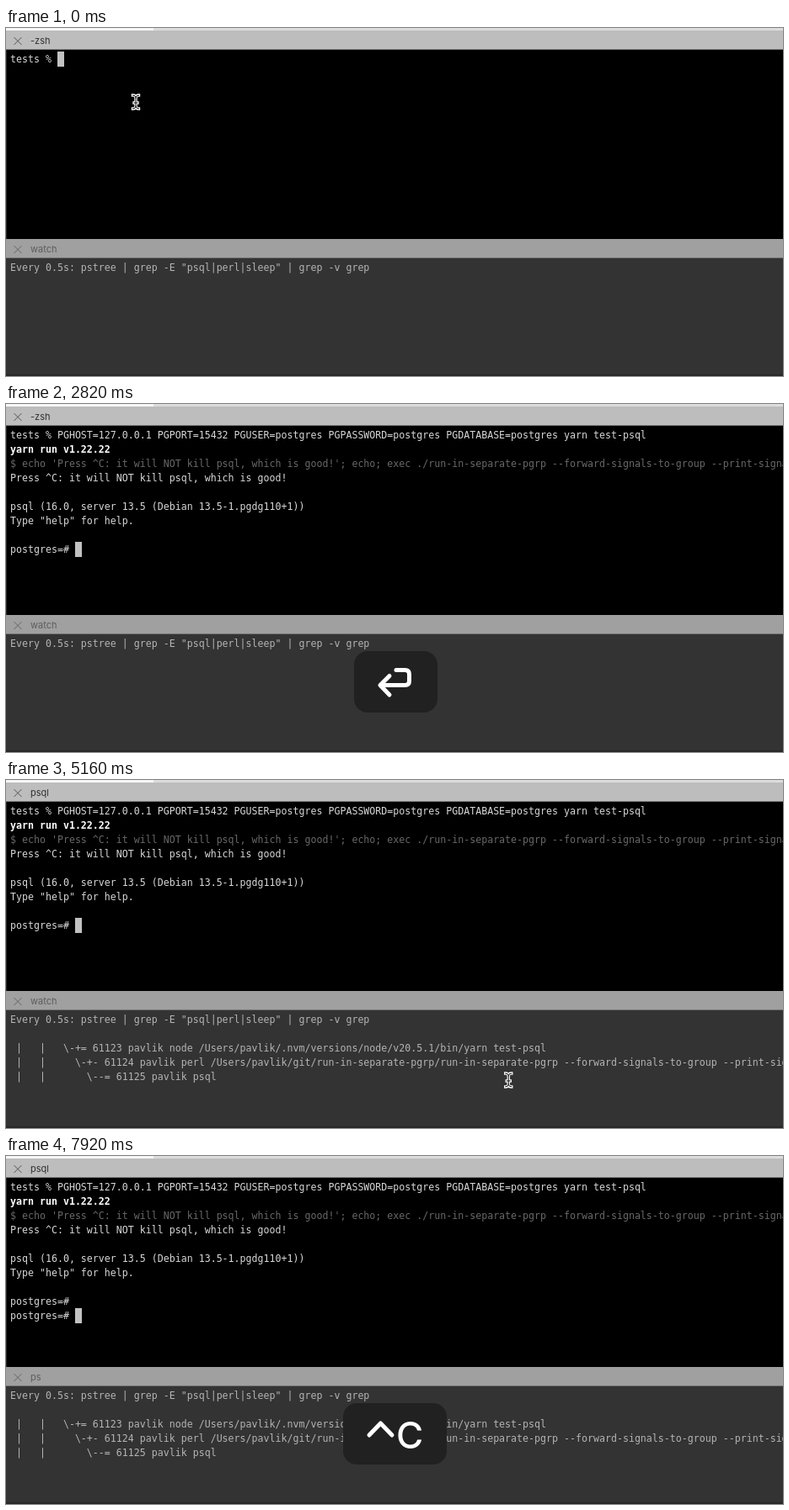
Recreate the animation shown at these times as an HTML page. Size 922x414 px, loop 8 s.

```html
<!DOCTYPE html>
<html lang="en">
<head>
<meta charset="utf-8">
<title>Terminal session</title>
<style>
  html, body { margin: 0; width: 100%; height: 100%; overflow: hidden; background: #000; }
  svg { display: block; width: 922px; height: 414px; }
  text { white-space: pre; }
  .term { font: 11.627px "DejaVu Sans Mono", "Noto Sans Mono", monospace; fill: #d8d8d8; }
  .low { fill: #b4b4b4; }
  .bold { font-weight: 700; fill: #fff; }
  .dim { fill: #686868; }
  .tab { font: 11px Inter, "Liberation Sans", sans-serif; }
  .key rect { fill: #212121; }
  .key path { fill: none; stroke: #fff; stroke-width: 5; stroke-linecap: round; stroke-linejoin: round; }
  .key text { font: 500 44px Inter, "Liberation Sans", sans-serif; fill: #fff; }
  #beam use { fill: none; stroke-linecap: square; }
</style>
</head>
<body>
<svg viewBox="0 0 922 414">
  <defs>
    <path id="beamShape" d="M-3.5-8q3.5 0 3.5 3v10q0 3-3.5 3M3.5-8q-3.5 0-3.5 3m0 10q0 3 3.5 3M-2 1h4"/>
  </defs>
  <rect width="922" height="414"/>
  <rect width="922" height="3" fill="#dcdcdc"/>
  <rect width="175" height="3" fill="#f6f6f6"/>
  <rect y="3" width="922" height="22" fill="#bdbdbd"/>
  <rect y="25" width="922" height="1" fill="#777"/>
  <rect y="26" width="1" height="225" fill="#2a2a2a"/>
  <rect y="251" width="922" height="22" fill="#a0a0a0"/>
  <rect y="273" width="922" height="1" fill="#707070"/>
  <rect y="274" width="922" height="140" fill="#333"/>
  <rect y="412" width="922" height="2" fill="#272727"/>
  <path d="M9.5 11l9 9m0-9l-9 9" stroke="#555"/>
  <path d="M9.5 259l9 9m0-9l-9 9" stroke="#666"/>
  <text id="topTab" class="tab" x="29" y="19" fill="#303030"></text>
  <text id="lowTab" class="tab" x="29" y="267" fill="#5c5c5c"></text>

  <g id="shell"></g>
  <rect id="caret" width="8" height="18" fill="#c2c2c2"/>
  <g id="watch"></g>

  <g class="key" id="up">
    <rect x="424" y="294" width="76" height="73" rx="16"/>
    <path d="M462 348V315M449 328l13-13 13 13"/>
  </g>
  <g class="key" id="enter">
    <rect x="413" y="294" width="99" height="73" rx="16"/>
    <path d="M463 316.5h10.5q5 0 5 5v8q0 5-5 5H446M455 323.5l-11 11 11 11.5"/>
  </g>
  <g class="key" id="ctrlC">
    <rect x="400" y="294" width="123" height="73" rx="16"/>
    <path d="M431 332l13.5-14 13.5 14"/>
    <text x="463" y="348">C</text>
  </g>

  <g id="mouse">
    <circle id="ring" cx="-.5" r="25" fill="none" stroke="#134288" stroke-width="3"/>
    <g id="beam">
      <use href="#beamShape" stroke="#fff" stroke-width="3.4"/>
      <use href="#beamShape" stroke="#111" stroke-width="1"/>
    </g>
  </g>
</svg>
<script>
const LOOP = 8000, COL = 7, ROW = 17, LEFT = 5;
const $ = id => document.getElementById(id);
const PROMPT = 'tests % ', PSQL = 'postgres=# ';
const FLAGS = '--forward-signals-to-group --print-signals';
const COMMAND = PROMPT + 'PGHOST=127.0.0.1 PGPORT=15432 PGUSER=postgres PGPASSWORD=postgres PGDATABASE=postgres yarn test-psql';

// Each row: text, style, time it appears
const shellRows = [
  [COMMAND, '', 0],
  ['yarn run v1.22.22', 'bold', 2700],
  ["$ echo 'Press ^C: it will NOT kill psql, which is good!'; echo; exec ./run-in-separate-pgrp " + FLAGS, 'dim', 2700],
  ['Press ^C: it will NOT kill psql, which is good!', '', 2760],
  ['', '', 2760],
  ['psql (16.0, server 13.5 (Debian 13.5-1.pgdg110+1))', '', 2760],
  ['Type "help" for help.', '', 2760],
  ['', '', 2760],
  [PSQL, '', 2760],
  [PSQL, '', 7680]
];
const watchRows = [
  ['Every 0.5s: pstree | grep -E "psql|perl|sleep" | grep -v grep', 'low', 0],
  ['', 'low', 0],
  [' |   |   \\-+= 61123 pavlik node /Users/pavlik/.nvm/versions/node/v20.5.1/bin/yarn test-psql', 'low', 3120],
  [' |   |     \\-+- 61124 pavlik perl /Users/pavlik/git/run-in-separate-pgrp/run-in-separate-pgrp ' + FLAGS, 'low', 3120],
  [' |   |       \\--= 61125 pavlik psql', 'low', 3120]
];
// Caret: time, row, column
const caretSteps = [
  [0, 0, PROMPT.length], [1920, 0, COMMAND.length], [2580, 1, 0],
  [2700, 3, 0], [2760, 8, PSQL.length], [7680, 9, PSQL.length]
];
// Pointer: time, x, y
const path = [
  [3480, 154, 88], [3900, 223, 130], [4260, 238, 335], [4500, 205, 354],
  [4980, 640, 352], [5160, 597, 357], [5520, 330, 345], [5940, 235, 300],
  [6420, 204, 219]
];

function addRows(parent, rows, baseline) {
  return rows.map(([text, style, from], i) => {
    const node = document.createElementNS('http://www.w3.org/2000/svg', 'text');
    node.setAttribute('class', 'term ' + style);
    node.setAttribute('x', LEFT);
    node.setAttribute('y', baseline + i * ROW);
    node.textContent = text;
    parent.append(node);
    return { node, from };
  });
}
const rows = [...addRows($('shell'), shellRows, 41), ...addRows($('watch'), watchRows, 289)];
const commandRow = rows[0].node;

const show = (node, on) => node.setAttribute('visibility', on ? 'visible' : 'hidden');
const between = (t, a, b) => t >= a && t < b;

function pointerAt(t) {
  if (t <= path[0][0]) return path[0].slice(1);
  const i = path.findIndex(p => p[0] > t);
  if (i < 0) return path[path.length - 1].slice(1);
  const [t0, x0, y0] = path[i - 1], [t1, x1, y1] = path[i];
  const k = (t - t0) / (t1 - t0);
  return [x0 + (x1 - x0) * k, y0 + (y1 - y0) * k];
}

function draw(t) {
  commandRow.textContent = t < 1920 ? PROMPT : COMMAND;
  rows.forEach(r => show(r.node, t >= r.from));

  const [, row, col] = caretSteps.filter(s => t >= s[0]).pop();
  $('caret').setAttribute('x', LEFT + col * COL);
  $('caret').setAttribute('y', 28 + row * ROW);

  $('topTab').textContent = t < 3000 ? '-zsh' : 'psql';
  $('lowTab').textContent = t < 7860 ? 'watch' : 'ps';

  show($('up'), between(t, 1920, 2580));
  show($('enter'), between(t, 2580, 3360));
  $('enter').setAttribute('opacity', Math.max(0, Math.min(1, (3360 - t) / 240)));
  show($('ctrlC'), t >= 7680);

  const [x, y] = pointerAt(t);
  $('mouse').setAttribute('transform', `translate(${x} ${y})`);
  show($('beam'), t < 1920 || between(t, 3480, 7680));
  show($('ring'), between(t, 6540, 6840));
}

function tick(now) {
  draw(now % LOOP);
  requestAnimationFrame(tick);
}
draw(0);
requestAnimationFrame(tick);
</script>
</body>
</html>
```
